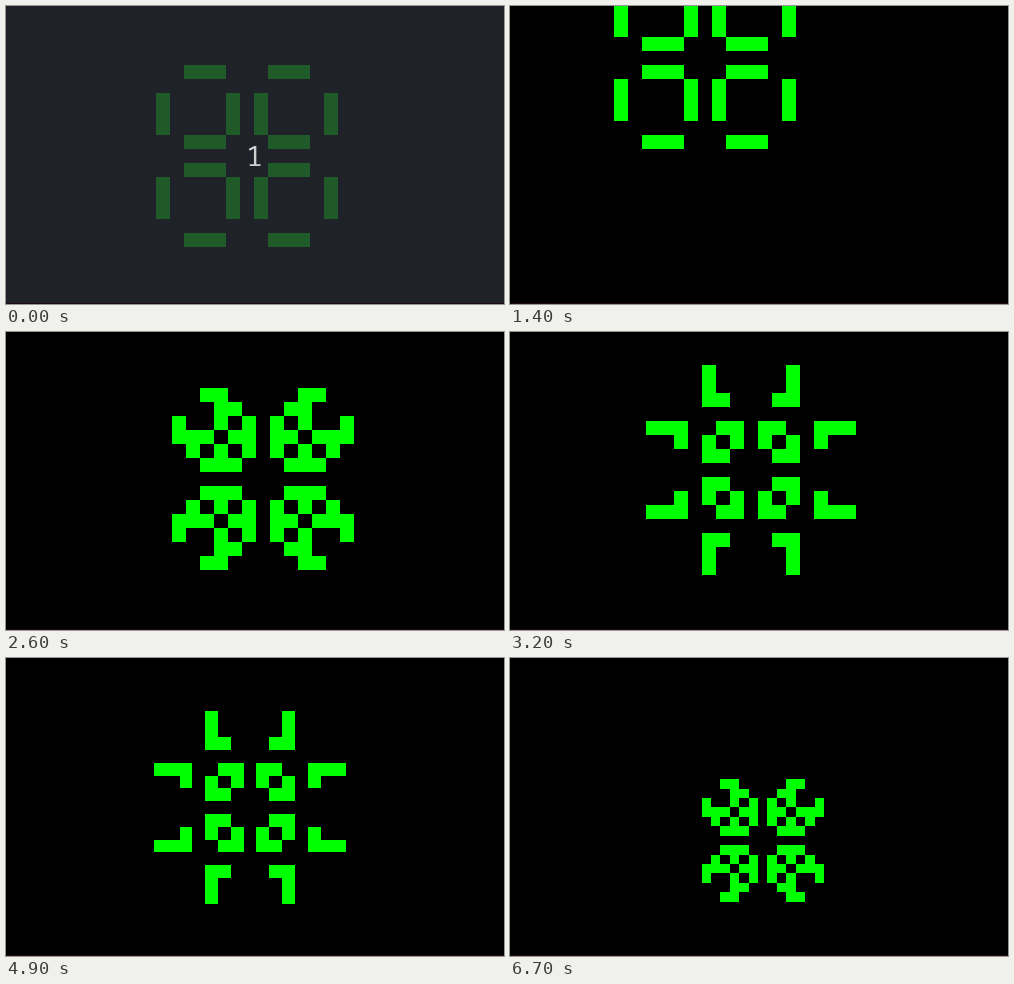
An HTML page with a canvas for the animation above (7200 ms loop, 498 by 298 pixels).

```html
<!DOCTYPE html>
<html lang="en">
<head>
<meta charset="utf-8">
<title>Pulsar</title>
<style>
  html, body { margin: 0; width: 100%; height: 100%; overflow: hidden; background: #000; }
  canvas { display: block; }
</style>
</head>
<body>
<canvas id="stage" width="498" height="298"></canvas>
<script>
const W = 498, H = 298, LOOP = 7200, STEP = 100;
const N = 17, CELL = 14;
const ctx = document.getElementById('stage').getContext('2d');

// Drag path of the pulsar's centre: time, x, y
const PAN = [
  [600, 241, 150], [700, 243, 145], [900, 241, 108], [1200, 220, 65],
  [1400, 195, 52], [1600, 138, 74], [1700, 123, 104], [1900, 150, 170],
  [2100, 227, 193], [2200, 251, 190], [2400, 271, 168], [2600, 257, 147],
  [2800, 240, 137], [3000, 240, 137], [3100, 241, 138]
];

// Wheel zoom around a fixed pointer: time, scale
const POINTER = [277, 274];
const ZOOM = [
  [3400, 1], [3500, 1.06], [3600, 1.13], [3700, 1.14], [3800, 1.155], [3900, 1.155],
  [4000, 1.3], [4100, 1.43], [4200, 1.332], [4300, 1.18], [4400, 1.18],
  [4700, 0.985], [4800, 0.985], [5100, 0.775], [5200, 0.673]
];

function seed() {
  const grid = new Uint8Array(N * N);
  for (const line of [0, 5, 7, 12])
    for (const i of [2, 3, 4, 8, 9, 10]) {
      grid[(line + 2) * N + i + 2] = 1;
      grid[(i + 2) * N + line + 2] = 1;
    }
  return grid;
}

function evolve(grid) {
  const at = (x, y) => (x < 0 || y < 0 || x >= N || y >= N ? 0 : grid[y * N + x]);
  return grid.map((alive, i) => {
    const x = i % N, y = Math.floor(i / N);
    let near = -alive;
    for (let dy = -1; dy <= 1; dy++)
      for (let dx = -1; dx <= 1; dx++) near += at(x + dx, y + dy);
    return near === 3 || (alive && near === 2) ? 1 : 0;
  });
}

const phases = [seed()];
phases.push(evolve(phases[0]));
phases.push(evolve(phases[1]));

function segment(keys, t) {
  let i = 0;
  while (i < keys.length - 2 && t >= keys[i + 1][0]) i++;
  const u = (t - keys[i][0]) / (keys[i + 1][0] - keys[i][0]);
  return [i, Math.min(1, Math.max(0, u))];
}

function linear(keys, t) {
  const [i, u] = segment(keys, t);
  return keys[i][1] + (keys[i + 1][1] - keys[i][1]) * u;
}

// Cubic Hermite curve with finite-difference slopes
function smooth(keys, t, k) {
  const [i, u] = segment(keys, t);
  const slope = j => {
    const a = keys[j - 1], b = keys[j + 1];
    return a && b ? (b[k] - a[k]) / (b[0] - a[0]) : 0;
  };
  const p = keys[i], q = keys[i + 1], d = q[0] - p[0];
  const u2 = u * u, u3 = u2 * u;
  return (2 * u3 - 3 * u2 + 1) * p[k] + (u3 - 2 * u2 + u) * d * slope(i) +
         (3 * u2 - 2 * u3) * q[k] + (u3 - u2) * d * slope(i + 1);
}

function drawCells(grid, cx, cy, size) {
  const edge = (c, i) => Math.round(c + (i - N / 2) * size);
  ctx.fillStyle = '#0f0';
  grid.forEach((alive, i) => {
    if (!alive) return;
    const col = i % N, row = Math.floor(i / N);
    const x = edge(cx, col), y = edge(cy, row);
    ctx.fillRect(x, y, edge(cx, col + 1) - x, edge(cy, row + 1) - y);
  });
}

function drawCountdown(opacity) {
  ctx.globalAlpha = opacity;
  ctx.fillStyle = 'rgba(40, 44, 52, 0.78)';
  ctx.fillRect(0, 0, W, H);
  ctx.fillStyle = '#cfd0d2';
  ctx.font = '28px "Noto Sans Mono", "DejaVu Sans Mono", monospace';
  ctx.textAlign = 'center';
  ctx.fillText('1', 248.5, 160);
  ctx.globalAlpha = 1;
}

function draw(time) {
  const t = Math.floor((time % LOOP) / STEP) * STEP;
  const gen = t < 200 ? 0 : 1 + Math.floor((t - 200) / 500);
  const zoom = linear(ZOOM, t);
  const place = k => POINTER[k - 1] + (smooth(PAN, t, k) - POINTER[k - 1]) * zoom;

  ctx.fillStyle = '#000';
  ctx.fillRect(0, 0, W, H);
  drawCells(phases[gen % 3], place(1), place(2), CELL * zoom);
  if (t < 200) drawCountdown(t < 100 ? 1 : 0.5);
  ctx.fillStyle = '#1f0a12';
  ctx.fillRect(0, H - 1, W, 1);
}

const start = performance.now();
function tick() {
  draw(performance.now() - start);
  requestAnimationFrame(tick);
}
tick();
</script>
</body>
</html>
```
